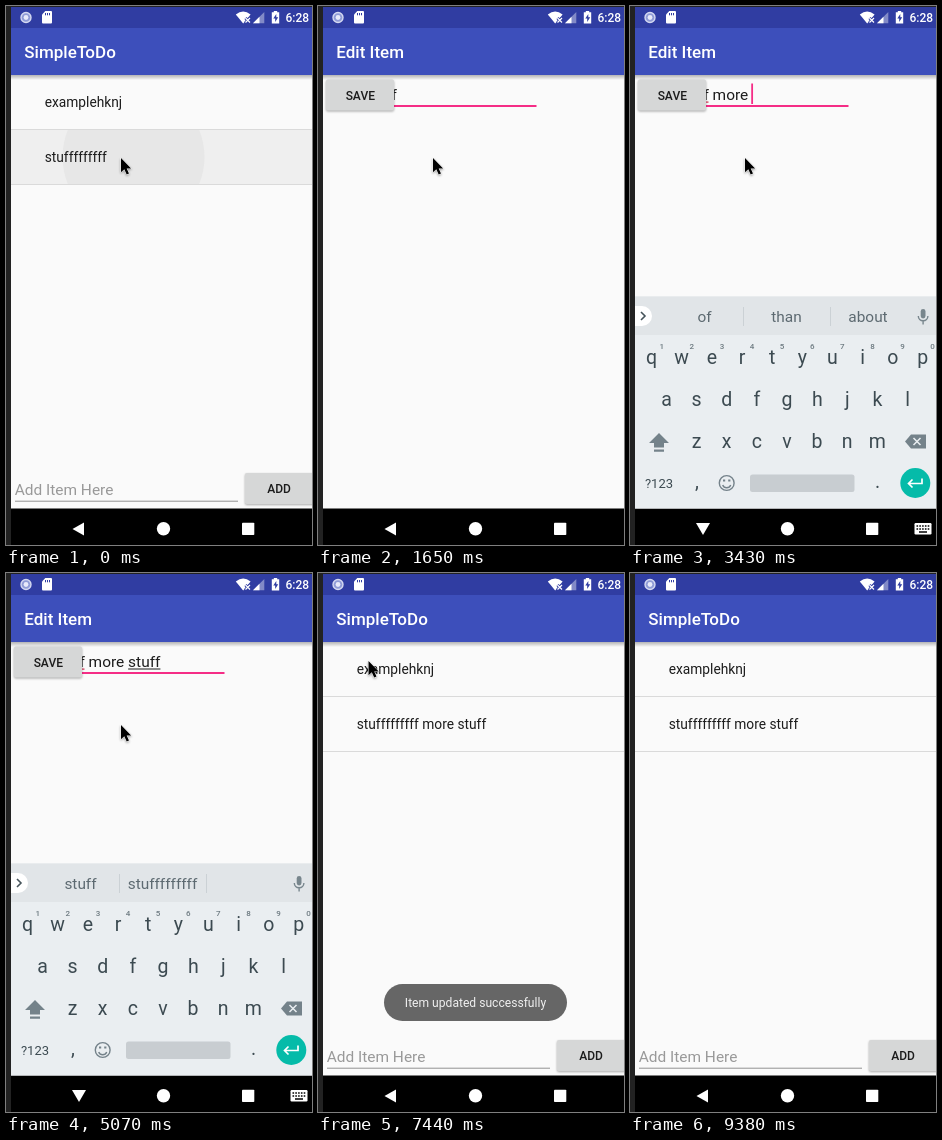
Write an HTML page that moves like this. It is 306 by 539 pixels and loops after 9.48 s.

```html
<!DOCTYPE html>
<html lang="en">
<head>
<meta charset="utf-8">
<title>To-do list</title>
<style>
  html, body { margin: 0; width: 100%; height: 100%; overflow: hidden; background: #222; }
  svg { display: block; font-family: Roboto, sans-serif; }
  text { white-space: pre; }
  .title { font-size: 17px; font-weight: 500; fill: #fff; }
  .item { font-size: 13.75px; fill: #1c1c1c; }
  .field { font-size: 15.46px; fill: #1c1c1c; }
  .button { filter: drop-shadow(0 1px 1px rgba(0,0,0,.32)); fill: #d6d7d7; }
  .label { font-size: 12px; font-weight: 500; fill: #1c1c1c; text-anchor: middle; }
  .key { font-size: 19.5px; fill: #3c4a51; text-anchor: middle; }
  .small { font-size: 13px; }
  .hint { font-size: 8px; font-weight: 500; fill: #6d7a81; text-anchor: middle; }
  .suggestion { font-size: 15.4px; fill: #5d6a71; text-anchor: middle; }
</style>
</head>
<body>
<svg width="306" height="539" viewBox="0 0 306 539">
  <defs>
    <linearGradient id="shade" x2="0" y2="1">
      <stop stop-color="#000" stop-opacity=".28"/>
      <stop offset="1" stop-color="#000" stop-opacity="0"/>
    </linearGradient>
    <clipPath id="rowClip"><rect x="5" y="124" width="301" height="54"/></clipPath>
    <clipPath id="saveClip"><rect x="8" y="73.5" width="68" height="31" rx="1.7"/></clipPath>
    <g id="frame">
      <rect x="5" y="1" width="301" height="502" fill="#fafafa"/>
      <rect x="5" y="69" width="301" height="5" fill="url(#shade)"/>
      <rect x="5" y="1" width="301" height="21" fill="#303da2"/>
      <rect x="5" y="22" width="301" height="47" fill="#3d4fbb"/>
      <rect x="5" y="502.5" width="301" height="60"/>
    </g>
  </defs>

  <g id="list">
    <use href="#frame"/>
    <text class="title" x="18.3" y="52">SimpleToDo</text>
    <g id="pressedRow" clip-path="url(#rowClip)">
      <rect x="5" y="124" width="301" height="54" fill="#efefef"/>
      <circle cx="127.5" cy="151" r="71" fill="#e7e7e7"/>
    </g>
    <path d="M5 123.5H306M5 178.5H306" stroke="#dadada"/>
    <text class="item" x="38.7" y="101">examplehknj</text>
    <text class="item" x="38.7" y="156" id="secondItem"></text>
    <text class="field" x="8.7" y="489" style="fill:#999">Add Item Here</text>
    <path d="M9 495.2H232" stroke="#929292"/>
    <rect class="button" x="239" y="467" width="70" height="31" rx="1.7"/>
    <text class="label" x="273" y="487">ADD</text>
  </g>

  <g id="edit">
    <use href="#frame"/>
    <text class="title" x="18.3" y="52">Edit Item</text>
    <text class="field" x="8.9" y="94" id="entry"></text>
    <rect id="misspelt" x="9" y="95.5" width="69.5" height="1.2" fill="#d32f4f"/>
    <rect id="composing" y="95.5" height="1" fill="#1c1c1c"/>
    <path d="M9 100H218.5" stroke="#f52d86" stroke-width="1.8"/>
    <rect id="caret" y="77.5" width="1.8" height="20.5" fill="#f52d86"/>
    <rect class="button" x="8" y="73.5" width="68" height="31" rx="1.7"/>
    <circle id="ripple" cx="50" cy="89" fill="#000" opacity=".1" clip-path="url(#saveClip)"/>
    <text class="label" x="42.3" y="93.5">SAVE</text>
  </g>

  <g id="keyboard">
    <rect x="5" y="290.5" width="301" height="212" fill="#eaeef1"/>
    <rect x="5" y="290.5" width="301" height="38.5" fill="#e1e5e8"/>
    <path d="M5 300H12a10 10 0 0 1 0 20H5Z" fill="#fff"/>
    <path d="M11 306l4 4-4 4" fill="none" stroke="#45535a" stroke-width="1.6"/>
    <path d="M113.5 301V320M200.5 301V320" stroke="#cbd1d5"/>
    <rect x="290.7" y="303" width="4.8" height="9.5" rx="2.4" fill="#78868d"/>
    <path d="M288.3 310a4.8 4.8 0 0 0 9.6 0M293.1 315v3.5" fill="none" stroke="#78868d" stroke-width="1.4"/>
    <g id="keys"></g>
    <path d="M29 427l10 10h-5v4.5H24V437h-5ZM24 443.5h10v2.3H24Z" fill="#74828a"/>
    <path d="M275 435.5l6-7h15v14h-15Z" fill="#74828a"/>
    <path d="M283.5 432l7 7m0-7l-7 7" stroke="#eaeef1" stroke-width="1.5"/>
    <g fill="none" stroke="#74828a" stroke-width="1.4">
      <circle cx="96.7" cy="477" r="7.4"/>
      <path d="M92.7 479a4.3 4.3 0 0 0 8 0"/>
    </g>
    <path d="M93 474.5h2.2m3 0h2.2" stroke="#74828a" stroke-width="2.2"/>
    <rect x="120" y="468.5" width="104.5" height="17.5" rx="2.5" fill="#c8cdd1"/>
    <circle cx="285.3" cy="477" r="15" fill="#05bba9"/>
    <path d="M292 472.5V477.5H278.5M282.5 473.5l-4 4 4 4" fill="none" stroke="#fff" stroke-width="1.7"/>
  </g>

  <g id="toast">
    <rect x="66" y="411" width="183" height="37" rx="18.5" fill="#666"/>
    <text x="157.5" y="434.3" font-size="12.1" fill="#f0f0f0" text-anchor="middle">Item updated successfully</text>
  </g>

  <g fill="#fff">
    <circle cx="20" cy="11.5" r="5" fill="#8f9bd6" stroke="#d5d9f1" stroke-width="1.4"/>
    <circle cx="20" cy="11.5" r="2.4" fill="#e8eafa"/>
    <path d="M39.3 5H45q1 0 1 1V16.500q0 1-1 1H37q-1 0-1-1V8.500Z"/>
    <path d="M39.500 7v2.300m2-2.300v2.300m2-2.300v2.300" stroke="#303da2"/>
    <path d="M229.800 8.500Q237.200 2.500 244.600 8.500L237.200 17.500Z"/>
    <path d="M239.500 12l4.500 4.500m0-4.500l-4.500 4.500" stroke="#303da2" stroke-width="3"/>
    <path d="M239.500 12l4.500 4.500m0-4.500l-4.500 4.500" stroke="#fff" stroke-width="1.200"/>
    <path d="M247 17.300L258.300 6V17.300Z" opacity=".4"/>
    <path d="M247 17.300L253.500 10.800V17.300Z"/>
    <path d="M267.800 5h3.400v1.300h2V17.500h-7.400V6.300h2Z"/>
    <path d="M270.300 8l-3 4.600h1.900v3.400l3-4.800h-1.900Z" fill="#303da2"/>
    <text x="279.500" y="16" font-size="12" font-weight="500">6:28</text>
  </g>

  <g fill="#fff">
    <path id="back" d="M66.500 523L78 516.500V529.500Z"/>
    <path id="dismiss" d="M66 517H80L73 529Z"/>
    <circle cx="157.500" cy="522.700" r="6.700"/>
    <rect x="236" y="516.800" width="12.300" height="12.300" rx=".8"/>
    <g id="switcher">
      <rect x="284.500" y="517" width="17" height="11.500" rx="1.200"/>
      <path d="M286.500 520h13m-13 3h13" stroke="#000" stroke-width="1.500" stroke-dasharray="1.600 1.200"/>
      <path d="M289 526h8" stroke="#000" stroke-width="1.500"/>
    </g>
  </g>

  <path id="mouse" d="M0 0V14.200L3.300 11.200L5.700 16.600L8 15.600L5.700 10.400H10.200Z" stroke="#fff" stroke-width="1"
        style="filter:drop-shadow(0 1px 1px rgba(0,0,0,.35));paint-order:stroke"/>
</svg>
<script>
const LOOP = 9480, TICK = 148.7;
const FIRST = 'stufffffffff';
const FIELD_X = 8.9;
const BLINKS = [3, 5, 8, 11, 15, 34, 38, 41, 44];
const SUGGESTIONS = {
  17: 'I the to', 19: 'm my me', 20: 'mo more most', 21: 'mor more morning',
  22: 'more mores moreover', 23: 'of than about', 26: 's so some', 27: 'st still stuff',
  28: 'stu stuff study', 29: 'stuf stuff ' + FIRST, 30: 'stuff ' + FIRST
};
// Each point is [tick, ...values].
const MOUSE = [[34, 115, 152], [38, 50.5, 88], [51, 50.5, 88], [53, 283, 416], [55, 283, 416], [59, 268, 545]];
const EDIT = [[0, 0, 43], [1, .71, 19], [2, 1, .6], [3, 1, 0], [46, 1, 0], [47, 1, .9], [48, 0, 37]];
const KEYBOARD = [[16, 0, 20], [17, .75, 9], [18, 1, 0], [46, 1, 0], [47, .66, 12.5], [48, 0, 54]];
const TOAST = [[48, 0], [49, .6], [50, 1], [59, 1], [63, 0]];

const $ = id => document.getElementById(id);
const set = (id, attrs) => { for (const name in attrs) $(id).setAttribute(name, attrs[name]); };
const show = (id, visible) => set(id, { opacity: +visible });
const smooth = p => p * p * (3 - 2 * p);

function sample(track, tick) {
  const next = track.findIndex(point => point[0] > tick);
  if (next === 0) return track[0].slice(1);
  if (next < 0) return track[track.length - 1].slice(1);
  const a = track[next - 1], b = track[next];
  const p = smooth((tick - a[0]) / (b[0] - a[0]));
  return a.slice(1).map((v, i) => v + (b[i + 1] - v) * p);
}

function addText(cls, x, y, content) {
  const el = document.createElementNS('http://www.w3.org/2000/svg', 'text');
  el.setAttribute('class', cls);
  el.setAttribute('x', x);
  el.setAttribute('y', y);
  el.textContent = content;
  $('keys').append(el);
  return el;
}

[['qwertyuiop', 21.5], ['asdfghjkl', 36.5], ['zxcvbnm', 66.5]].forEach(([letters, x], row) =>
  [...letters].forEach((c, i) => addText('key', x + 30.15 * i, 358 + 42 * row, c)));
[...'1234567890'].forEach((c, i) => addText('hint', 31.7 + 30.1 * i, 342.5, c));
addText('key small', 29, 482, '?123');
addText('key', 67, 482, ',');
addText('key', 247.5, 482, '.');
const slots = [74.5, 156.5, 238].map(x => addText('suggestion', x, 316, ''));

function placeWindow(id, track, tick) {
  const [opacity, y] = sample(track, tick);
  set(id, { opacity, transform: `translate(0 ${y})` });
}

function drawEntry(tick) {
  const typed = (word, start) => word.slice(0, Math.max(0, tick - start));
  const tail = typed(' more ', 17) + typed('stuff', 25);
  const entry = $('entry');
  entry.textContent = FIRST + tail;
  const width = entry.getComputedTextLength();
  const wordStart = entry.textContent.lastIndexOf(' ') + 1;
  const before = wordStart && wordStart < entry.textContent.length
    ? entry.getSubStringLength(0, wordStart) : width;
  set('composing', { x: FIELD_X + before, width: width - before });
  show('composing', tick < 47);
  show('misspelt', tick >= 18 && tick < 47);
  set('caret', { x: FIELD_X + width - .9 });
  show('caret', BLINKS.filter(b => b <= tick).length % 2);
  set('ripple', { r: Math.max(0, tick - 43) * 25 });
}

function render(tick) {
  show('pressedRow', tick < 24);
  $('secondItem').textContent = FIRST + (tick < 24 ? '' : ' more stuff');
  drawEntry(tick);
  placeWindow('edit', EDIT, tick);
  placeWindow('keyboard', KEYBOARD, tick);

  const key = Object.keys(SUGGESTIONS).filter(k => k <= tick).pop();
  const words = key ? SUGGESTIONS[key].split(' ') : [];
  slots.forEach((slot, i) => slot.textContent = words[i] || '');

  const keyboardOpen = tick >= 17 && tick < 47;
  show('back', !keyboardOpen);
  show('dismiss', keyboardOpen);
  show('switcher', keyboardOpen);
  set('toast', { opacity: sample(TOAST, tick)[0] });
  set('mouse', { transform: `translate(${sample(MOUSE, tick)})` });
  show('mouse', tick < 59);
}

function loop() {
  render(Math.floor(performance.now() % LOOP / TICK));
  requestAnimationFrame(loop);
}
loop();
</script>
</body>
</html>
```
